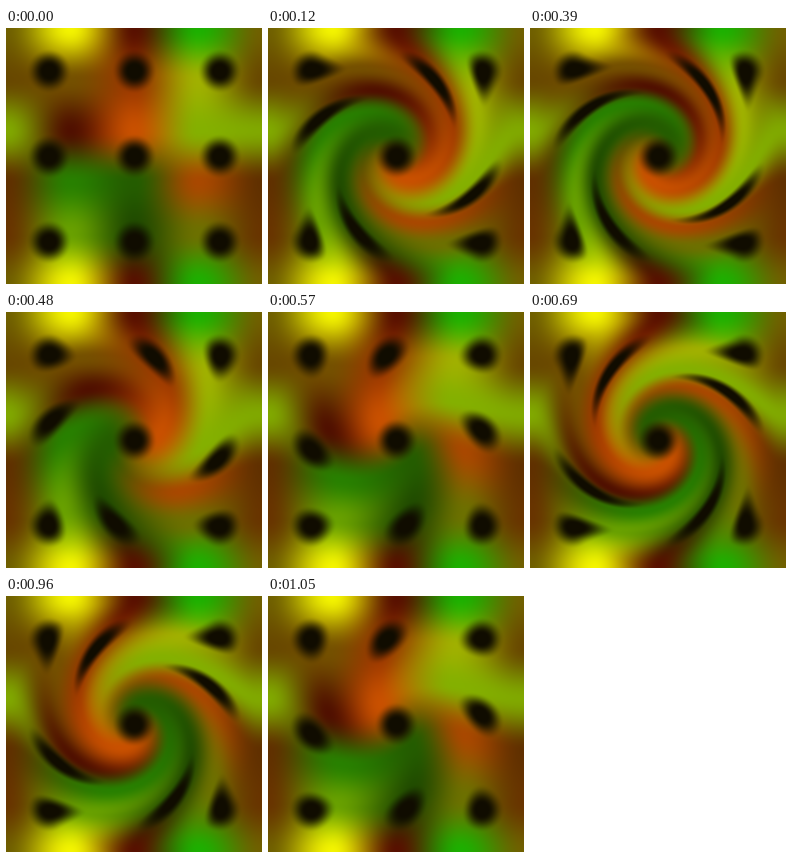
An HTML page with a canvas for the animation above (1080 ms loop, 256 by 256 pixels).

```html
<!DOCTYPE html>
<html>
<head>
<meta charset="utf-8">
<style>
html, body { margin: 0; width: 100%; height: 100%; overflow: hidden; background: #000; }
canvas { display: block; width: 100vw; height: 100vh; }
</style>
</head>
<body>
<canvas id="stage" width="256" height="256"></canvas>
<script>
const SIZE = 256, HALF = 128, LOOP = 1080, STEP = 30;
const TURN = 60 * Math.PI / 180; // added twist per step
const ctx = document.getElementById('stage').getContext('2d');
const image = ctx.createImageData(SIZE, SIZE);
const base = new Float32Array(SIZE * SIZE * 2);

// Red and green of a wrapping colour grid, one row per fifth of the height
const grid = [
  '7060 f4f4 5810 1cb0',
  '6848 7450 9838 a0b0',
  '80a8 5010 c850 84b0',
  '6030 2880 245c a848',
  '6834 68a0 2048 6c70'
].map(row => row.split(' ').map(c => [parseInt(c.slice(0, 2), 16), parseInt(c.slice(2), 16)]));

const mix = (a, b, k) => a + (b - a) * k;
const smooth = k => { k = Math.min(1, Math.max(0, k)); return k * k * (3 - 2 * k); };

function ground(x, y, channel) {
  const u = x / 64, v = y / 51.2;
  const c = Math.floor(u), r = Math.floor(v);
  const at = (i, j) => grid[j % 5][i % 4][channel];
  const k = smooth(u - c);
  return mix(mix(at(c, r), at(c + 1, r), k), mix(at(c, r + 1), at(c + 1, r + 1), k), smooth(v - r));
}

function buildBase() {
  const pitch = SIZE / 3;
  for (let y = 0, i = 0; y < SIZE; y++) {
    for (let x = 0; x < SIZE; x++, i += 2) {
      const d = Math.hypot(x % pitch - pitch / 2, y % pitch - pitch / 2);
      const light = smooth((d - 6) / 17);
      base[i] = mix(16, ground(x, y, 0), light);
      base[i + 1] = mix(12, ground(x, y, 1), light);
    }
  }
}

function sample(x, y, channel) {
  const x0 = Math.floor(x), y0 = Math.floor(y);
  const at = (i, j) => base[((j & 255) * SIZE + (i & 255)) * 2 + channel];
  return mix(mix(at(x0, y0), at(x0 + 1, y0), x - x0),
             mix(at(x0, y0 + 1), at(x0 + 1, y0 + 1), x - x0), y - y0);
}

// Twist fades with the square of the distance to the rim
function draw(twist) {
  for (let y = 0, i = 0; y < SIZE; y++) {
    for (let x = 0; x < SIZE; x++, i += 4) {
      const dx = x - HALF, dy = y - HALF;
      const fade = Math.max(0, 1 - Math.hypot(dx, dy) / HALF);
      const a = twist * fade * fade, cos = Math.cos(a), sin = Math.sin(a);
      const sx = HALF + dx * cos + dy * sin;
      const sy = HALF + dy * cos - dx * sin;
      image.data[i] = sample(sx, sy, 0);
      image.data[i + 1] = sample(sx, sy, 1);
      image.data[i + 3] = 255;
    }
  }
  ctx.putImageData(image, 0, 0);
}

// Triangle wave over 36 steps: 0, up to 9, down to -9, back to 0
const wave = n => 9 - Math.abs((n + 9) % 36 - 18);

let shown = -1;
function tick() {
  const step = Math.floor(performance.now() % LOOP / STEP);
  if (step !== shown) {
    draw(TURN * wave(step));
    shown = step;
  }
  requestAnimationFrame(tick);
}

buildBase();
tick();
</script>
</body>
</html>
```
